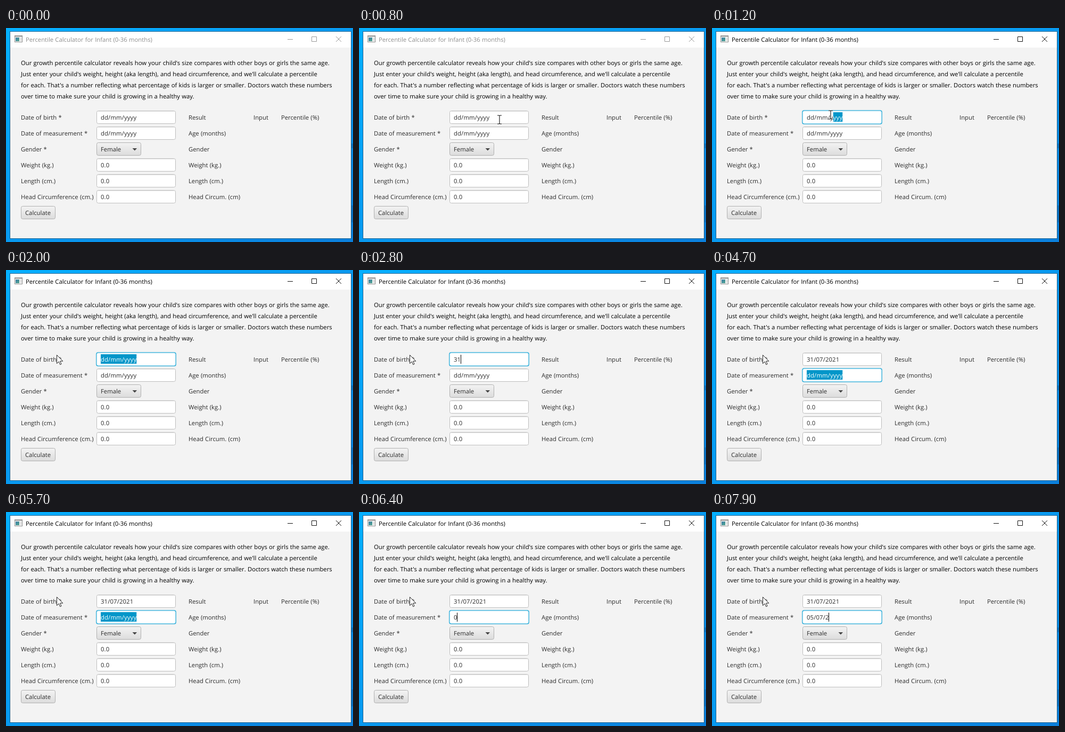
Write an HTML page that moves like this. It is 652 px wide and 404 px high and loops after 8000 ms.

```html
<!DOCTYPE html>
<html lang="en">
<head>
<meta charset="utf-8">
<title>Percentile Calculator</title>
<style>
  html, body { margin: 0; width: 100%; height: 100%; overflow: hidden; background: #0a9cf0; }
  svg { display: block; }
  text {
    font: 11.29px "Open Sans", "Noto Sans", sans-serif;
    word-spacing: .3px;
    text-rendering: geometricPrecision;
    fill: #2b2b2b;
    white-space: pre;
  }
  .intro text { fill: #000; }
  .value { letter-spacing: .14px; }
  .picked { fill: #fff; }
</style>
</head>
<body>
<svg id="stage" width="652" height="404" viewBox="0 0 652 404">
  <defs>
    <linearGradient id="desk" x1="0" y1="0" x2="1" y2="1">
      <stop offset="0" stop-color="#04b0ff"/>
      <stop offset=".5" stop-color="#0799f0"/>
      <stop offset="1" stop-color="#0a7fdc"/>
    </linearGradient>
    <linearGradient id="face" x1="0" y1="0" x2="0" y2="1">
      <stop offset="0" stop-color="#f3f3f3"/>
      <stop offset="1" stop-color="#dcdcdc"/>
    </linearGradient>
    <linearGradient id="icon" x1="0" y1="0" x2="1" y2="1">
      <stop offset="0" stop-color="#3d7fa8"/>
      <stop offset="1" stop-color="#4fa38c"/>
    </linearGradient>
  </defs>
  <rect width="652" height="404" fill="url(#desk)"/>
  <path d="M649 218h3v9h-3zM649 335h3v32h-3z" fill="#0a5fa8" opacity=".5"/>
  <rect x="7" y="6" width="642" height="392" fill="#1c628f"/>
  <rect x="8" y="7" width="640" height="390" fill="#f3f3f3"/>
  <rect x="8" y="7" width="640" height="30" fill="#fff"/>

  <rect x="16.5" y="14.5" width="14" height="12" fill="#fafafa" stroke="#8c8c8c"/>
  <path d="M17 16h13" stroke="#b5b5b5" stroke-width="2"/>
  <rect x="18" y="18" width="7" height="7" fill="url(#icon)"/>
  <path d="M26.5 19.5h3M26.5 21.5h3M26.5 23.5h3" stroke="#c4c4c4"/>
  <text id="title" x="37" y="25.5">Percentile Calculator for Infant (0-36 months)</text>
  <path id="controls" d="M529 21.5h10M574.5 16.5h9v9h-9zM620 16l10 10M630 16l-10 10" fill="none"/>

  <g id="form"></g>
  <g id="beam">
    <path d="M-4 -8h3l1 1 1-1h3M-4 8h3l1-1 1 1h3M0 -7v14" fill="none" stroke="#fff" stroke-width="2.4" opacity=".6"/>
    <path d="M-4 -8h3l1 1 1-1h3M-4 8h3l1-1 1 1h3M0 -7v14" fill="none" stroke="#111" stroke-width="1.1"/>
  </g>
  <path id="arrow" d="M-.5 -.5V15.5L3.2 12 5.6 17.6 8 16.6 5.6 11.1H10.8Z" fill="#fff" stroke="#222" stroke-width="1"/>
</svg>
<script>
const LOOP = 8000, STEP = 100;
const $ = id => document.getElementById(id);
const form = $('form');

function add(parent, tag, attrs, words) {
  const el = document.createElementNS('http://www.w3.org/2000/svg', tag);
  for (const k in attrs) el.setAttribute(k, attrs[k]);
  if (words !== undefined) el.textContent = words;
  parent.append(el);
  return el;
}
const set = (el, attrs) => { for (const k in attrs) el.setAttribute(k, attrs[k]); };
const label = (x, y, words) => add(form, 'text', { x, y }, words);
const rowY = i => 156 + 30 * i;

// Static text
const intro = add(form, 'g', { class: 'intro' });
[
  "Our growth percentile calculator reveals how your child's size compares with other boys or girls the same age.",
  "Just enter your child's weight, height (aka length), and head circumference, and we'll calculate a percentile",
  "for each. That's a number reflecting what percentage of kids is larger or smaller. Doctors watch these numbers",
  "over time to make sure your child is growing in a healthy way."
].forEach((line, i) => add(intro, 'text', { x: 28, y: 70 + 21 * i }, line));

[
  ['Date of birth *', 'Result'],
  ['Date of measurement *', 'Age (months)'],
  ['Gender *', 'Gender'],
  ['Weight (kg.)', 'Weight (kg.)'],
  ['Length (cm.)', 'Length (cm.)'],
  ['Head Circumference (cm.)', 'Head Circum. (cm)']
].forEach(([left, right], i) => {
  label(28, rowY(i) + 17, left);
  label(343, rowY(i) + 17, right);
});
label(465, 173, 'Input');
label(517, 173, 'Percentile (%)');

function button(x, y, w, words) {
  add(form, 'rect', { x: x + .5, y: y + .5, width: w - 1, height: 24, rx: 3, fill: 'url(#face)', stroke: '#b0b0b0' });
  label(x + 8, y + 17, words);
}
button(170, 216, 84, 'Female');
add(form, 'path', { d: 'M237.5 227h8.6l-4.3 4.6z', fill: '#444' });
button(28, 336, 65, 'Calculate');

// Text field with focus ring, selection and caret
function field(row, start) {
  const y = rowY(row), textAt = { x: 178, y: y + 17, class: 'value' };
  const glow = add(form, 'rect', { x: 168.5, y: y - 1.5, width: 152, height: 28, rx: 4, fill: '#039ed3', opacity: .15 });
  const ring = add(form, 'rect', { x: 169.5, y: y - .5, width: 150, height: 26, rx: 3.5, fill: '#039ed3' });
  const box = add(form, 'rect', { x: 170.5, y: y + .5, width: 148, height: 24, rx: 3, fill: '#fff' });
  const shade = add(form, 'path', { d: `M172 ${y + 1.5}h145`, stroke: '#e9e9e9' });
  const text = add(form, 'text', textAt, start);
  const mark = add(form, 'rect', { y: y + 3, height: 18, fill: '#0096c9' });
  const clip = add(add(form, 'clipPath', { id: 'clip' + row }), 'rect', { y, height: 25 });
  const picked = add(form, 'text', { ...textAt, class: 'value picked', 'clip-path': `url(#clip${row})` }, start);
  const caret = add(form, 'rect', { y: y + 4, width: 1, height: 17, fill: '#000' });
  const edge = n => 178 + (n ? text.getSubStringLength(0, n) : 0);
  const reveal = (el, on) => set(el, { visibility: on ? 'visible' : 'hidden' });

  return {
    y, edge,
    show(words, focused, from) {
      text.textContent = picked.textContent = words;
      const n = words.length, a = edge(from), b = edge(n);
      set(box, { stroke: focused ? '#fff' : '#bdbdbd', 'stroke-width': focused ? 0 : 1 });
      reveal(glow, focused);
      reveal(ring, focused);
      reveal(shade, !focused);
      const span = { x: a, width: focused ? Math.max(0, b - a) : 0 };
      set(mark, span);
      set(clip, span);
      set(caret, { x: Math.round(b - .3) });
      reveal(caret, focused && from === n);
    }
  };
}

const HINT = 'dd/mm/yyyy';
const birth = field(0, HINT), measured = field(1, HINT);
const fields = [birth, measured, ...[3, 4, 5].map(i => field(i, '0.0'))];
fields.slice(2).forEach(f => f.show('0.0', false, 3));

// Key times for each typed character
const typing = {
  birth: { words: '31/07/2021', keys: [2400, 2800, 3000, 3200, 3500, 3700, 3900, 4100, 4200, 4400] },
  measured: { words: '05/07/2', keys: [6200, 6600, 6800, 7100, 7300, 7500, 7800] }
};
const typed = ({ words, keys }, t) => words.slice(0, keys.filter(k => k <= t).length);

const CLICK = 1000, RELEASE = 1600, TAB = 4700;

function pointer(t) {
  if (t < CLICK) {
    const p = Math.min(1, t / 900), e = p * p * (3 - 2 * p);
    return [656 - 406 * e, 392 - 227 * e];
  }
  const p = Math.min(1, (t - CLICK) / (RELEASE - CLICK)), e = p ** 1.6;
  return [250 - 154 * e, 165 - 4 * e];
}

function draw(t) {
  const active = t >= CLICK;
  set($('title'), { style: `fill:${active ? '#000' : '#8e8e8e'}` });
  set($('controls'), { stroke: active ? '#111' : '#999' });

  const [x, y] = pointer(t);
  const first = typed(typing.birth, t), second = typed(typing.measured, t);

  let from = first.length;
  if (!first) {
    from = HINT.length;
    birth.show(HINT, false, from);
    if (active) while (from > 0 && birth.edge(from - 1) > x) from--;
  }
  birth.show(first || HINT, active && t < TAB, from);
  measured.show(second || HINT, t >= TAB, second.length);

  const dragging = active && t < RELEASE;
  const over = x > 170 && x < 319 && fields.some(f => y > f.y && y < f.y + 25);
  const beam = dragging || over;
  const place = `translate(${Math.round(x)} ${Math.round(y)})`;
  set($('beam'), { transform: place, visibility: beam ? 'visible' : 'hidden' });
  set($('arrow'), { transform: place, visibility: beam ? 'hidden' : 'visible' });
}

const begin = performance.now();
function tick(now) {
  const t = Math.max(0, now - begin) % LOOP;
  draw(Math.floor(t / STEP) * STEP);
  requestAnimationFrame(tick);
}
draw(0);
requestAnimationFrame(tick);
</script>
</body>
</html>
```
